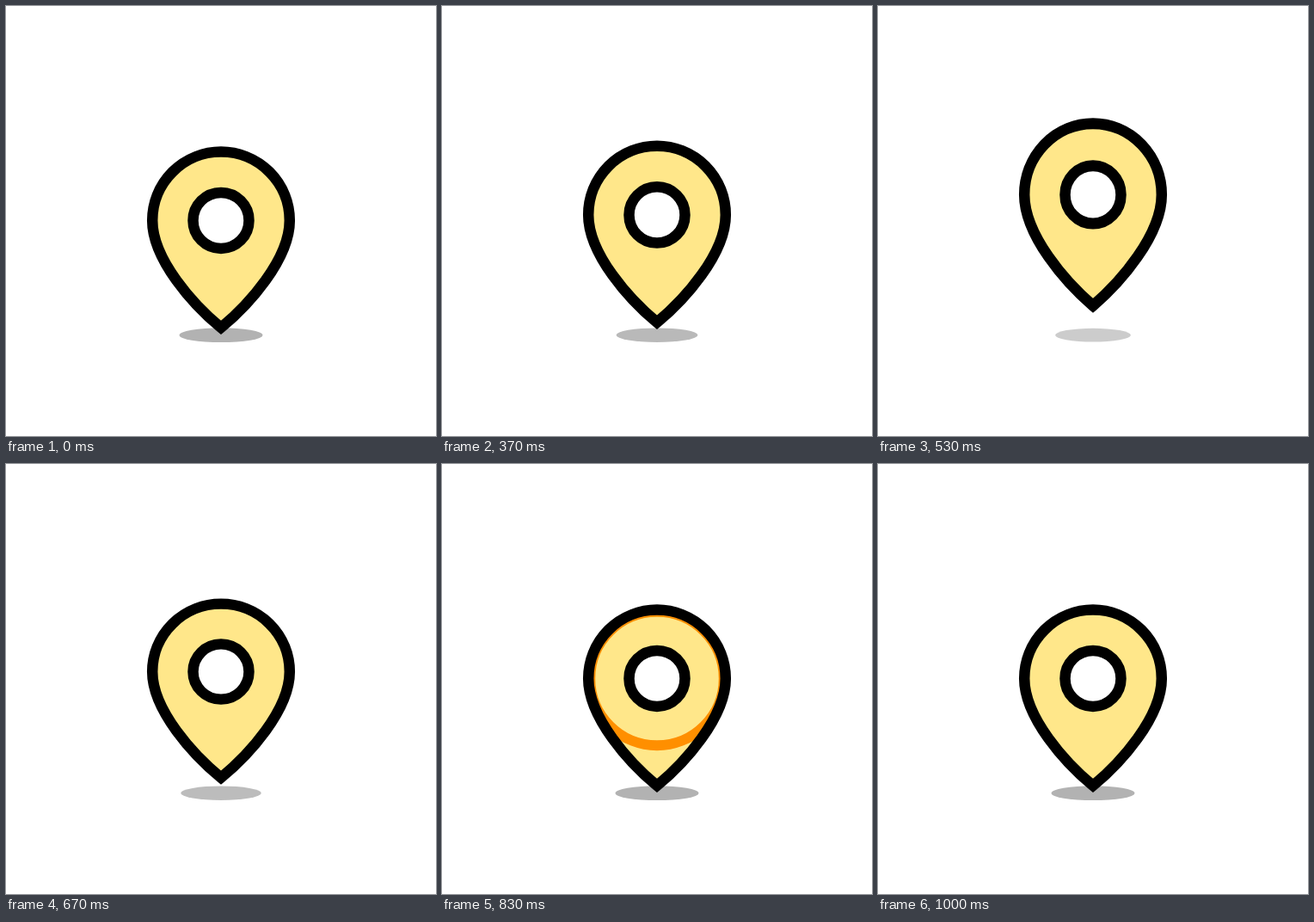
Animation, 500 px wide and 500 px high, one loop 1510 ms. Source, as an HTML page:

```html
<!DOCTYPE html>
<html lang="en">
<head>
<meta charset="utf-8">
<title>Map pin</title>
<style>
  html, body { margin: 0; width: 100%; height: 100%; overflow: hidden; background: #fff; }
  svg { display: block; width: 100%; height: 100%; }
  #shadow { filter: blur(0.5px); }
</style>
</head>
<body>
<svg viewBox="0 0 500 500">
  <defs>
    <path id="drop" d="M250 374C218.5 348 170.2 295 170.2 249.4A79.8 79.8 0 0 1 329.8 249.4C329.8 295 281.5 348 250 374Z"/>
  </defs>
  <ellipse id="shadow" cx="250" cy="382.7"/>
  <g id="pin" stroke-width="12.5" stroke-miterlimit="10">
    <use href="#drop" fill="#ffe78a"/>
    <circle id="ring" cx="250" cy="249.4" fill="none"/>
    <use href="#drop" fill="none" stroke="#000"/>
    <circle cx="250" cy="249.4" r="32.5" fill="#fff" stroke="#000"/>
  </g>
</svg>
<script>
const LOOP = 1510;
const STEP = 1000 / 30;
const TIP = 382;

// Key moments, counted in steps
const RISE = 5, PEAK = 17, SQUASH = 21, LAND = 22, REST = 25, RING_END = 30;

const [shadow, pin, ring] = ["shadow", "pin", "ring"].map(id => document.getElementById(id));

function set(node, attrs) {
  for (const name in attrs) node.setAttribute(name, attrs[name]);
}

// Smooth 0 to 1 between two steps; a higher power starts more slowly
function ease(step, from, to, power = 1) {
  const p = Math.min(1, Math.max(0, (step - from) / (to - from))) ** power;
  return p * p * (3 - 2 * p);
}

function drawRing(step) {
  const visible = step > SQUASH && step < RING_END;
  ring.style.display = visible ? "" : "none";
  if (!visible) return;
  const age = step - SQUASH;
  const p = age / (RING_END - SQUASH);
  set(ring, {
    r: 32.6 + 11.3 * age,
    "stroke-width": 12.6 * (1 - p ** 4),
    stroke: `rgb(255, ${Math.round(130 + 3.2 * age)}, 0)`
  });
}

function draw(time) {
  const step = Math.floor((time % LOOP + 4) / STEP);
  const lift = 26.7 * (ease(step, RISE, PEAK, 1.7) - ease(step, PEAK, LAND));
  const stretch = 1 + 0.039 * ease(step, RISE, PEAK, 2.4)
    - 0.06 * ease(step, PEAK, SQUASH) + 0.021 * ease(step, SQUASH, REST);
  set(pin, { transform: `translate(0 ${TIP - lift}) scale(1 ${stretch}) translate(0 ${-TIP})` });
  set(shadow, {
    rx: 48.5 - 0.18 * lift,
    ry: 8.4 - 0.02 * lift,
    "fill-opacity": 0.3 - 0.004 * lift
  });
  drawRing(step);
}

const start = performance.now();
function tick() {
  draw(performance.now() - start);
  requestAnimationFrame(tick);
}
tick();
</script>
</body>
</html>
```
